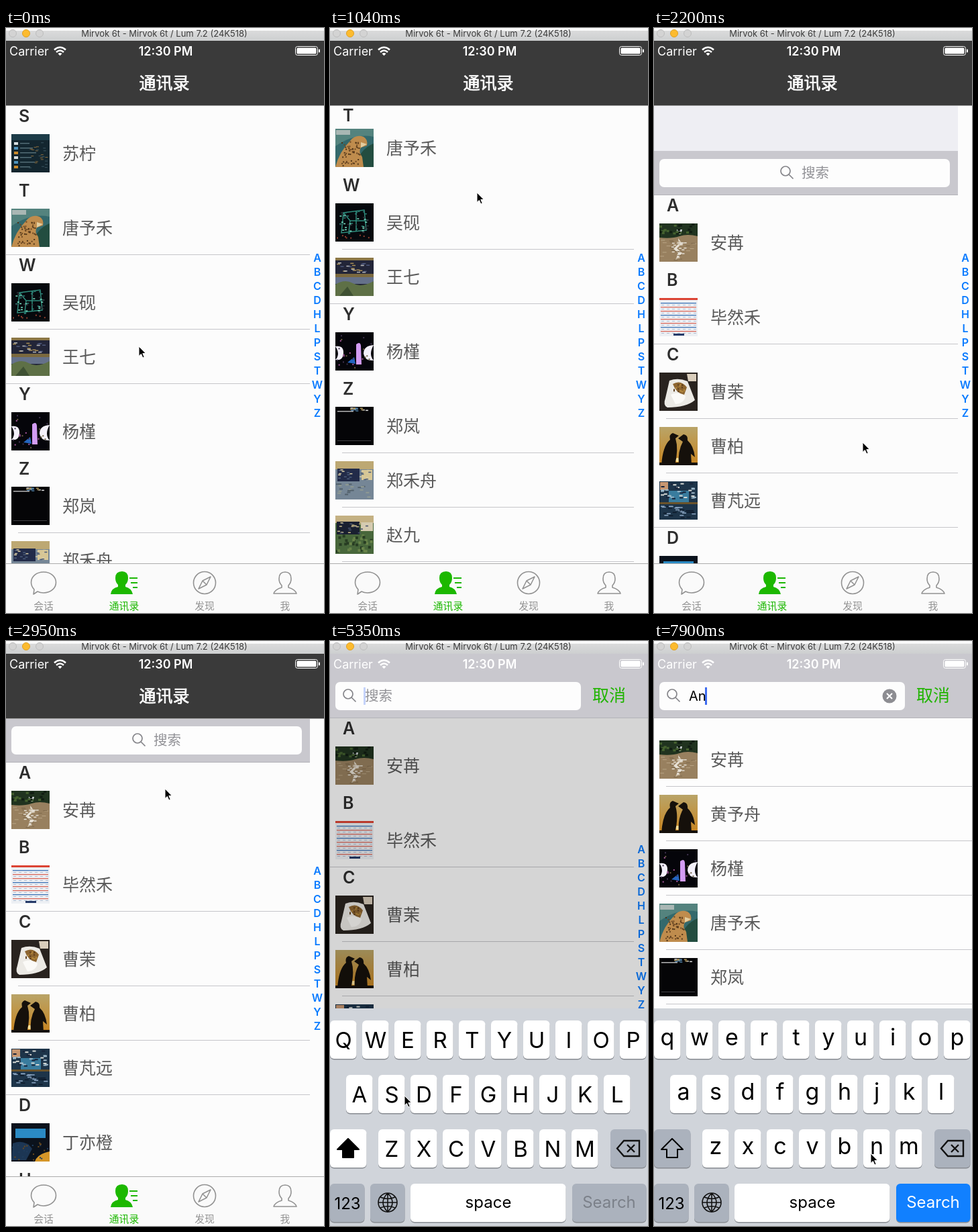
Recreate the animation shown at these times as an HTML page. Size 474x871 px, loop 8 s.

```html
<!DOCTYPE html>
<html lang="zh">
<head>
<meta charset="utf-8">
<title>通讯录</title>
<style>
html, body { margin: 0; width: 100%; height: 100%; overflow: hidden; background: #fcfcfc; }
svg { display: block; width: 100vw; height: 100vh; }
text { font-family: Inter, "Noto Sans CJK SC", "Noto Sans CJK", sans-serif; white-space: pre; }
.mid { text-anchor: middle; }
.name { font-size: 25px; fill: #5a5a5a; }
.head { font-size: 25px; font-weight: 600; fill: #2d2d2d; }
.index { font-size: 16px; font-weight: 600; fill: #0a7bff; text-anchor: middle; }
.tab { font-size: 14.8px; fill: #929292; text-anchor: middle; }
.key { font-size: 33px; text-anchor: middle; }
.word { font-size: 24px; text-anchor: middle; }
.sep { stroke: #c6c6ca; }
.icon { fill: none; stroke: #929292; stroke-width: 1.6; stroke-linejoin: round; stroke-linecap: round; }
</style>
</head>
<body>
<svg id="stage" viewBox="0 0 474 871" xmlns="http://www.w3.org/2000/svg"></svg>
<script>
const LOOP = 8000, NAV = 115, BAR = 66, HEAD = 30, ROW = 81;
const $ = id => document.getElementById(id);
const set = (id, attrs) => { for (const k in attrs) $(id).setAttribute(k, attrs[k]); };
const show = (id, on) => set(id, { display: on ? 'inline' : 'none' });
const clamp = (v, a = 0, b = 1) => Math.min(b, Math.max(a, v));
const mix = (a, b, p) => a + (b - a) * p;
const smooth = u => u * u * (3 - 2 * u);
const easeOut = u => 1 - (1 - u) ** 3;
const span = (t, start, len) => clamp((t - start) / len);

const path = (fill, d, more = '') => `<path fill="${fill}" d="${d}" ${more}/>`;
const rect = (fill, x, y, w, h, more = '') =>
  `<rect fill="${fill}" x="${x}" y="${y}" width="${w}" height="${h}" ${more}/>`;
const text = (cls, x, y, s, more = '') => `<text class="${cls}" x="${x}" y="${y}" ${more}>${s}</text>`;
const line = (d, color, w = 2) => path('none', d, `stroke="${color}" stroke-width="${w}"`);
const tile = c => rect(c, 0, 0, 57, 57);

// Seeded speckles inside a box.
function specks(seed, n, colors, x, y, w, h, sw = 2, sh = 2) {
  const rnd = () => (seed = (seed * 16807) % 2147483647) / 2147483647;
  let out = '';
  for (let i = 0; i < n; i++)
    out += rect(colors[i % colors.length], (x + rnd() * (w - sw)).toFixed(1), (y + rnd() * (h - sh)).toFixed(1), sw, sh);
  return out;
}

const stripes = (n, y, gap, fn) => Array.from({ length: n }, (_, i) => fn(i, y + i * gap)).join('');

const pics = {
  log: tile('#13262f') + rect('#1d3c48', 0, 0, 57, 9) +
    stripes(6, 12, 7, (i, y) => rect(['#d5dde0', '#4d93bd', '#c98a2b'][i % 3], 4, y, 6, 4) + rect('#536d76', 13, y + 1, 14 + i * 5 % 12, 1.5)) +
    specks(7, 24, ['#3b5560', '#8a6b3c'], 26, 10, 30, 44, 4, 1),
  cat: tile('#34696c') + path('#234d40', 'M30 57Q36 30 57 22V57z') + path('#54837e', 'M0 0h57v12Q30 6 0 26z') +
    path('#bf8c4d', 'M0 57Q6 34 22 18Q30 8 42 12Q49 16 47 25L38 28Q34 34 40 42L42 57z') + path('#e2cda0', 'M38 20L47 23L38 28z') +
    rect('#a9b7b4', 1, 2, 21, 7) + specks(31, 50, ['#4f3519', '#6b4723'], 9, 17, 29, 40),
  neon: tile('#06090d') + line('M12 14L43 10L46 40L9 44zM12 14L22 26H45M22 26L20 43M31 12V42', '#2f8c7c', 1.5) +
    specks(12, 46, ['#2b7f76', '#7adfc4', '#31323a'], 6, 10, 44, 36, 3, 1.5) + specks(5, 8, ['#92402f'], 2, 46, 53, 9),
  field: tile('#222538') + rect('#8c7745', 0, 0, 57, 4) + rect('#7b693f', 0, 24, 57, 5) + rect('#65718a', 0, 29, 57, 10) +
    path('#5e7046', 'M0 40Q14 31 26 38T57 35V57H0z') + path('#3f5133', 'M6 57L18 43L27 57z') +
    specks(9, 22, ['#a88e55', '#4e587b', '#bcbcbc'], 2, 6, 53, 17, 5, 1.5),
  lights: tile('#05050a') + path('#f4f1fb', 'M0 21Q13 19 12 32Q11 43 0 41Q8 33 0 21zM57 19Q42 20 42 32Q44 43 57 42Q49 33 57 19z') +
    path('#d39cf3', 'M31 18Q37 13 38 20L39 48H31z') + path('#2465c0', 'M18 45L28 37L30 47z') +
    specks(21, 22, ['#40324e', '#6d6042', '#a6579b'], 2, 4, 53, 50),
  dark: tile('#050507') + specks(3, 14, ['#b49b5c', '#4f7fa5', '#d8d8d8'], 22, 1, 34, 6, 4, 1.5) + rect('#b5b5b5', 3, 6, 24, 1.5) + rect('#414145', 3, 50, 50, 1),
  camp: tile('#758696') + rect('#bda873', 0, 0, 57, 12) + rect('#222b49', 3, 11, 33, 19) + rect('#d7c694', 39, 13, 16, 15) +
    specks(19, 24, ['#d7cba4', '#4a5b79'], 4, 12, 50, 17, 4, 1.5) + specks(8, 20, ['#53616c', '#8f9a92'], 1, 32, 55, 24, 5, 2),
  wood: tile('#48673b') + rect('#c4b183', 0, 0, 57, 11) + rect('#191f30', 2, 9, 34, 19) + rect('#d5cbb1', 38, 10, 18, 13) +
    specks(29, 20, ['#c9b988', '#46516d'], 3, 10, 50, 17, 4, 1.5) + specks(15, 34, ['#273c23', '#688349'], 1, 28, 55, 28, 4, 4),
  flood: tile('#98805f') + path('#20331f', 'M0 0H57V19Q42 15 30 19T0 21z') + path('#d7dde0', 'M26 9h8l-2 7h-5z') +
    path('#e7e1d5', 'M28 22L34 30L26 37L34 44L24 55L28 44L21 38L29 30z') +
    specks(17, 22, ['#45622f', '#101c12'], 0, 0, 57, 17, 4, 3) + specks(6, 24, ['#b8a384', '#7d684b'], 1, 23, 55, 33, 6, 1) +
    specks(33, 16, ['#e3ddd2'], 18, 24, 24, 32, 4, 1.5),
  calendar: tile('#edf0f4') + rect('#dc4434', 0, 0, 57, 3) +
    stripes(8, 7, 6, (i, y) => rect(i % 3 ? '#d96a5c' : '#3e74b6', 2, y, 53, 1.3) + stripes(7, 3, 8, (_, x) => rect('#b3bfd2', x, y + 3, 4, 1))) +
    rect('#263b69', 21, 53, 16, 3),
  plate: tile('#29231f') + path('#eceae5', 'M15 12Q28 7 42 13L53 41Q40 52 12 52Q5 49 9 38z') + path('#d9cdbb', 'M41 2h14v11H43z') +
    path('#8d6530', 'M20 17Q32 10 41 22L37 33Q25 31 20 17z') + path('#fbfaf7', 'M17 33Q26 27 39 35Q37 46 24 47z') +
    specks(13, 18, ['#5a3a18', '#b68a3d'], 21, 16, 17, 14),
  birds: rect('url(#dusk)', 0, 0, 57, 57) + `<circle cx="27" cy="49" r="3" fill="#ffe29a"/>` +
    path('#15100b', 'M3 57Q5 28 16 19Q14 11 20 9L29 13L24 17Q29 33 23 57zM29 57Q27 36 35 22L28 17L36 11Q43 12 42 20Q51 28 53 45L47 40L48 57z') + rect('#15100b', 0, 53, 57, 4),
  board: tile('#1d3449') + rect('#c79670', 1, 1, 12, 12) + rect('#397c9e', 14, 14, 30, 20) + rect('#6a532b', 0, 31, 57, 3) +
    specks(11, 32, ['#9ebacb', '#162238', '#d4d7d3'], 2, 2, 53, 28, 5, 2) + specks(23, 30, ['#8ca6c3', '#0d192a'], 2, 36, 53, 19, 6, 1.5),
  arcade: tile('#0b121c') + rect('#2b8ac4', 6, 8, 45, 14) + path('#1c3654', 'M2 30Q20 23 31 38L22 55H0z') +
    path('#d59628', 'M35 57Q38 46 57 42V57z') + specks(25, 24, ['#203d5d', '#6b4a1c'], 1, 27, 55, 29)
};

const contacts = {
  A: ['安苒 flood'], B: ['毕然禾 calendar'], C: ['曹茉 plate', '曹柏 birds', '曹芃远 board'], D: ['丁亦橙 arcade'],
  H: ['黄予舟 birds'], L: ['李棠禾 camp', '林苇 log'], P: ['潘苒 field'], S: ['苏柠 log'], T: ['唐予禾 cat'],
  W: ['吴砚 neon', '王七 field'], Y: ['杨槿 lights'], Z: ['郑岚 dark', '郑禾舟 camp', '赵九 wood']
};
const letters = Object.keys(contacts);
const found = {
  A: ['安苒 flood', '毕然禾 calendar', '曹茉 plate', '曹柏 birds', '曹芃远 board', '黄予舟 birds'],
  An: ['安苒 flood', '黄予舟 birds', '杨槿 lights', '唐予禾 cat', '郑岚 dark']
};

function row(entry, y, x1, x2, id = '') {
  const [name, pic] = entry.split(' ');
  const rule = x1 < 0 ? '' : `<path class="sep" ${id && `id="${id}"`} d="M${x1} ${y + 80.5}H${x2}"/>`;
  return `<use href="#pic-${pic}" x="8" y="${y + 12}"/>${text('name', 84, y + 50, name)}${rule}`;
}

const sections = [];
function contactList() {
  let y = 0, cells = '', heads = '';
  for (const k of letters) {
    const top = y, list = contacts[k];
    y += HEAD;
    list.forEach((c, i) => {
      const last = i === list.length - 1 && k !== 'Z';
      cells += row(c, y, last ? ('ADSY'.includes(k) ? -1 : 0) : 18, 453, last ? 'end' + k : '');
      y += ROW;
    });
    heads += `<g id="head${k}">${rect('#fcfcfc', 0, 0, 453, HEAD, 'class="strip"')}${text('head', 19, 24, k)}</g>`;
    sections.push({ k, top, end: y });
  }
  return `<g id="cells">${cells}</g>${heads}`;
}

const resultList = q => `<g id="found${q}">${rect('#fdfdfd', 0, NAV, 474, 440)}${found[q].map((c, i) => row(c, 136 + i * ROW, 18, 474)).join('')}</g>`;

const cap = (x, y, w, fill, more = '') =>
  rect('#888c92', x, y + 1.5, w, 57, 'rx="6"') + rect(fill, x, y, w, 57, 'rx="6" ' + more);

function keyboard() {
  const rows = ['QWERTYUIOP', 'ASDFGHJKL', 'ZXCVBNM'], left = [0, 24, 72], grey = '#abb2bd';
  let caps = '', upper = '', lower = '';
  rows.forEach((s, r) => [...s].forEach((c, i) => {
    const x = left[r] + i * 48, y = 565 + r * 81;
    caps += cap(x, y, 39.5, '#fff', 'class="cap"');
    upper += text('key', x + 20, y + 41, c);
    lower += text('key', x + 20, y + 37, c.toLowerCase(), 'style="font-size:34px"');
  }));
  return `<g id="keyboard">${rect('#d0d4da', 0, 547, 474, 324)}${caps}
    <g id="upper">${upper}</g><g id="lower">${lower}</g>
    ${cap(0, 727, 54.5, '#fff', 'id="shift"')}
    ${path('#000', 'M27 741L43 757H35V769H19V757H11z', 'id="arrow" stroke="#000" stroke-width="2" stroke-linejoin="round"')}
    ${cap(418, 727, 53.5, grey)}${line('M428 755.5L438 744H461V767H438zM443 750L454 761M454 750L443 761', '#111', 2.4)}
    ${cap(0, 808, 51.5, grey)}${text('word', 26, 846, '123')}
    ${cap(60, 808, 51.5, grey)}
    ${line('M72 836a14 14 0 1 0 28 0a14 14 0 1 0-28 0zH100M86 822V850M86 822q-14 14 0 28q14-14 0-28M75 828q11 5 22 0M75 844q11-5 22 0', '#111', 1.6)}
    ${cap(120, 808, 231.5, '#fff', 'class="cap"')}${text('word', 236, 844, 'space')}
    ${cap(361, 808, 110.5, grey, 'id="go"')}${text('word', 416, 844, 'Search', 'id="goText"')}</g>`;
}

const person = 'M416 810q9 0 9 10q0 6-4 10v3q10 3 12 9h-34q2-6 12-9v-3q-4-4-4-10q0-10 9-10z';
const tabBar = () => rect('#fafafa', 0, 797, 474, 74) + line('M0 797.5H474', '#adadad', 1) +
  `<path class="icon" d="M56 810c11 0 18.500 7 18.500 15.500s-8 15.500-18.500 15.500q-5 0-9-2l-6 4l1-7q-4.500-5-4.500-10.500c0-9 8-15.500 18.500-15.500z"/>
  <g fill="#1cb800"><path d="M173 809q9 0 9 10q0 6-4 10v3q9 2 11 11h-33q1-9 11-11v-3q-4-4-4-10q0-10 10-10z"/>
  <path d="M184 818h12v2h-12zM186 825h10v2h-10zM189 832h7v2h-7z"/></g>
  <circle class="icon" cx="296" cy="826" r="16.500"/><path class="icon" d="M305 817L299 829L287 835L293 823zM293 823L299 829"/>
  <path class="icon" d="${person}"/>` +
  text('tab', 56, 866, '会话') + text('tab', 176, 866, '通讯录', 'style="fill:#1cb800"') +
  text('tab', 296, 866, '发现') + text('tab', 416, 866, '我');

const status = () => text('', 5, 41, 'Carrier', 'font-size="18" fill="#fff"') +
  `<g fill="none" stroke="#fff" stroke-width="2.600"><path d="M72 32.500q8.500-7.500 17 0M75 36q5.500-5 11 0"/></g>` +
  path('#fff', 'M77.500 38.200q3-2.500 6 0l-3 3z') +
  text('mid', 238, 41, '12:30 PM', 'font-size="18" font-weight="600" fill="#fff"') +
  rect('none', 431.5, 27.5, 33, 13, 'rx="3" stroke="#fff"') + rect('#fff', 433.5, 29.5, 29, 9, 'rx="1.500"') + rect('#fff', 466, 31.5, 2, 5, 'rx="1"');

const titleBar = () => rect('url(#chrome)', 0, 0, 474, 19) + rect('#fafafa', 0, 0, 474, 4) +
  ['#d3d3d3', '#fcbb2f', '#d3d3d3'].map((c, i) => `<circle cx="${10 + i * 20}" cy="8" r="5.500" fill="${c}" stroke="${i === 1 ? '#dfa023' : '#bdbdbd'}"/>`).join('') +
  text('mid', 236, 12.5, 'Mirvok 6t - Mirvok 6t / Lum 7.2 (24K518)', 'font-size="13" fill="#3c3c3c"');

const fade = (id, a, b) => `<linearGradient id="${id}" x2="0" y2="1"><stop stop-color="${a}"/><stop offset="1" stop-color="${b}"/></linearGradient>`;

$('stage').innerHTML = `<defs>${fade('dusk', '#b9a468', '#c8841f')}${fade('chrome', '#dedede', '#cdcfd0')}
  ${Object.keys(pics).map(k => `<g id="pic-${k}">${pics[k]}</g>`).join('')}</defs>
  ${rect('#fcfcfc', 0, 0, 474, 871)}${rect('#eeeef3', 0, NAV, 453, 0, 'id="above"')}
  ${contactList()}
  ${letters.map((k, i) => text('index', 464, 0, k, `id="index${i}"`)).join('')}
  ${rect('#000', 0, 0, 474, 871, 'id="dim"')}
  ${resultList('A')}${resultList('An')}
  ${rect('#c9c8ce', 0, 0, 453, BAR, 'id="bar"')}<path id="barLine" stroke="#b3b3b8"/>
  <g id="search">${rect('#fdfdfd', 8, 0, 433, 42, 'rx="7" id="field"')}
    <g id="lens" fill="none" stroke="#85858a" stroke-width="1.700"><circle cx="-2" cy="18" r="7"/><path d="M3 23L9.500 29.500"/></g>
    ${text('', 0, 27.5, '搜索', 'id="hint" font-size="20.500" fill="#919196"')}
    ${text('', 52, 28, '', 'id="query" font-size="20" fill="#000"')}
    ${rect('#3f6df0', 50, 8, 3, 26, 'id="caret"')}
    <g id="clear"><circle cx="351" cy="21" r="10.500" fill="#8d8d92"/>${line('M347 17l8 8m0-8l-8 8', '#fff', 2)}</g>
    ${text('', 391, 28.5, '取消', 'id="cancel" font-size="25" fill="#20b400"')}</g>
  <g id="nav">${rect('#3a3a3a', 0, 19, 474, 96)}${line('M0 115.5H474', '#9a9a9a', 1)}
    ${text('mid', 236, 91, '通讯录', 'font-size="25" fill="#fff" stroke="#fff" stroke-width="0.700"')}</g>
  ${status()}${tabBar()}${keyboard()}${titleBar()}
  ${path('#000', 'M0 0V14.500L3.400 11.400L5.900 17L8.200 16L5.800 10.500H10.300z', 'id="mouse" stroke="#fff" stroke-width="1"')}`;

// Linear track through [time, ...values] points.
function track(points, t) {
  let i = 1;
  while (i < points.length - 1 && points[i][0] < t) i++;
  const [a, b] = [points[i - 1], points[i]], p = span(t, a[0], b[0] - a[0]);
  return a.slice(1).map((v, j) => mix(v, b[j + 1], p));
}

const scroll = [[0, -904], [150, -925], [600, -1055], [750, -1062], [900, -1035], [1040, -1023], [1180, -1021],
  [1330, -1000], [1480, -820], [1770, -210], [1910, 60], [2060, 215], [2200, 249], [2350, 235], [2500, 205],
  [2650, 188], [2800, 182], [2950, 181]];
const pointer = [[0, 198, 474], [600, 219, 245], [1180, 219, 245], [1330, 222, 252], [1910, 300, 590], [2200, 311, 617],
  [2350, 311, 617], [2950, 237, 220], [3400, 240, 144], [4450, 240, 144], [5050, 122, 660], [5350, 111, 677],
  [5650, 45, 690], [6400, 44, 693], [7300, 290, 745], [7600, 323, 763], [8000, 323, 763]];
const typed = [[6250, 'A'], [7600, 'An']];

const ticks = [0];
for (let i = 0; ticks[i] < LOOP; i++) ticks.push(ticks[i] + ([6, 7, 10, 12, 14].includes(i) ? 140 : 150));
const snap = ms => ticks.filter(v => v <= ms).pop();

function draw(ms) {
  const t = snap(ms);
  const open = smooth(span(t, 4200, 570)), slide = easeOut(span(t, 4100, 300)), keys = easeOut(span(t, 4100, 540));
  const moving = open > 0 && open < 1;
  const y = Math.round(track(scroll, t)[0] - BAR * open);
  const last = typed.filter(e => e[0] <= t).pop(), query = last ? last[1] : '';

  set('cells', { transform: `translate(0 ${y})` });
  for (const { k, top, end } of sections) {
    const pinned = y + top < NAV;
    set('head' + k, { transform: `translate(0 ${Math.min(Math.max(y + top, NAV), y + end - HEAD)})` });
    if ($('end' + k)) show('end' + k, !pinned);
  }
  document.querySelectorAll('.strip').forEach(e => { e.setAttribute('fill', moving ? '#ececec' : '#fcfcfc'); e.setAttribute('width', open ? 474 : 453); });
  letters.forEach((_, i) => set('index' + i, { y: mix(458, 425.5, open) + (i - 5.5) * (moving ? 19.85 : 21) + 5.8 }));

  const width = open ? 474 : 453, top = y - BAR - (open ? 30 : 0);
  set('above', { height: Math.max(0, top - NAV) });
  set('bar', { y: top, height: y - top, width });
  set('barLine', { d: `M0 ${y - 0.5}H${width}` });
  set('dim', { y, opacity: 0.155 * open * open });

  set('search', { transform: `translate(0 ${y - 54})` });
  set('field', { width: mix(433, 366, slide), fill: moving ? '#f4f4f4' : '#fdfdfd' });
  set('lens', { transform: `translate(${mix(198, 29, slide)} 0)` });
  set('hint', { x: mix(220, 52, slide) });
  set('cancel', { opacity: slide });
  show('hint', !query);
  show('clear', query);
  $('query').textContent = query;
  const blink = clamp(0.5 + 1.1 * Math.cos((t - 4630) / 1000 * 2 * Math.PI));
  set('caret', { x: [50, 64, 76][query.length], opacity: t < 4400 ? 0 : last && t - last[0] < 700 ? 1 : blink });
  show('foundA', query === 'A');
  show('foundAn', query === 'An');

  set('nav', { transform: `translate(0 ${Math.round(-93 * open)})` });
  show('nav', open < 1);

  set('keyboard', { transform: `translate(0 ${Math.round(324 * (1 - keys))})` });
  show('keyboard', keys > 0);
  show('upper', !query);
  show('lower', query);
  document.querySelectorAll('.cap').forEach(e => e.setAttribute('fill', keys < 1 ? '#f5f5f5' : '#fff'));
  set('shift', { fill: query ? '#abb2bd' : keys < 1 ? '#f5f5f5' : '#fff' });
  set('arrow', { fill: query ? 'none' : '#000' });
  set('go', { fill: query ? '#1180ff' : '#abb2bd' });
  set('goText', { fill: query ? '#fff' : '#7b8089' });

  const [mx, my] = track(pointer, t);
  set('mouse', { transform: `translate(${mx} ${my})` });
}

const begin = performance.now();
function loop() {
  draw((performance.now() - begin) % LOOP);
  requestAnimationFrame(loop);
}
loop();
</script>
</body>
</html>
```
